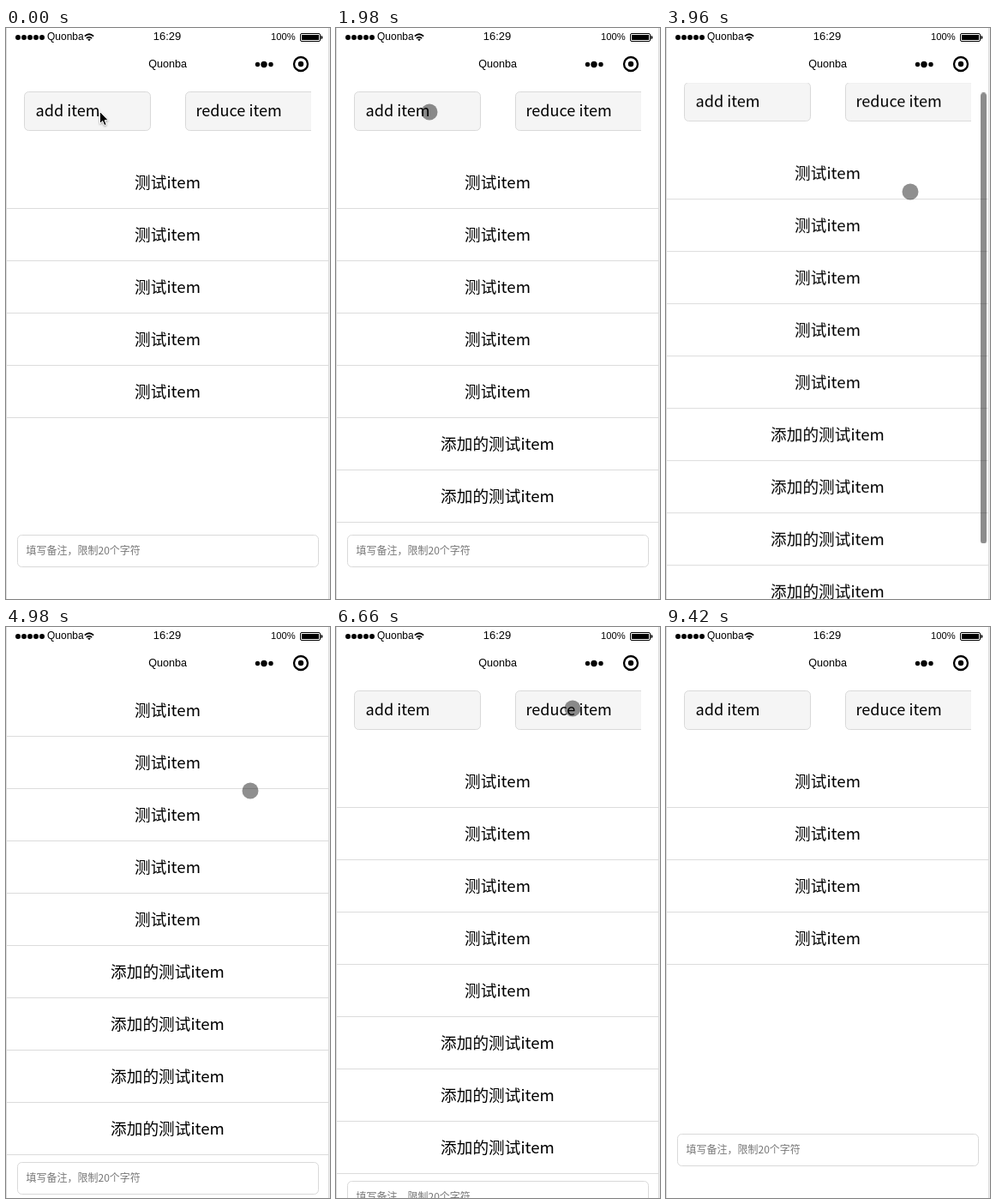
Recreate the animation shown at these times as an HTML page. Size 378 px wide and 666 px high, loop 9480 ms.

```html
<!DOCTYPE html>
<html lang="zh">
<head>
<meta charset="utf-8">
<title>List demo</title>
<style>
  html, body { margin: 0; width: 100%; height: 100%; overflow: hidden; background: #fff; }
  svg { display: block; }
  text { font-family: "Noto Sans CJK SC", "Noto Sans CJK", sans-serif; font-size: 18.67px; }
  .bar text { font-family: "Liberation Sans", Arial, sans-serif; }
  .mid { text-anchor: middle; }
  .btn rect { fill: #f5f5f5; stroke: #d9d9d9; }
  .btn text { font-size: 18.1px; }
  .rule { fill: #dcdcdc; }
</style>
</head>
<body>
<svg width="378" height="666" viewBox="0 0 378 666">
  <defs>
    <clipPath id="view"><rect y="64" width="378" height="602"/></clipPath>
    <clipPath id="toolbar"><rect x="20" y="70" width="336" height="60"/></clipPath>
  </defs>

  <g clip-path="url(#view)">
    <g id="page">
      <g clip-path="url(#toolbar)">
        <g class="btn" id="add">
          <rect x="21.5" y="74.5" width="147" height="45" rx="5"/>
          <text x="34.5" y="103">add item</text>
        </g>
        <g class="btn" id="reduce">
          <rect x="209.5" y="74.5" width="160" height="45" rx="5"/>
          <text x="221.5" y="103">reduce item</text>
        </g>
      </g>
      <g id="rows"></g>
      <g id="note">
        <rect x="13.5" y="591.5" width="351" height="37" rx="5" fill="#fff" stroke="#d9d9d9"/>
        <text x="23.5" y="614" style="font-size:12px" fill="#777">填写备注，限制20个字符</text>
      </g>
    </g>
    <rect id="thumb" x="367" y="66" width="7" height="526" rx="3.5" fill="#000" fill-opacity=".45"/>
  </g>

  <g class="bar">
    <g id="signal"></g>
    <text x="48" y="14.3" style="font-size:12px">Quonba</text>
    <g fill="none" stroke="#000" stroke-width="1.8">
      <path d="M91.8 9.6Q97 4.8 102.2 9.6M93.9 12Q97 9.2 100.1 12"/>
      <path d="M97 15.2L95.2 13.2Q97 11.8 98.8 13.2Z" fill="#000" stroke="none"/>
    </g>
    <text class="mid" x="188" y="14.3" style="font-size:13px">16:29</text>
    <text x="309" y="14.3" style="font-size:11.2px">100%</text>
    <rect x="343.5" y="6.5" width="23" height="9" rx="1.5" fill="none" stroke="#000"/>
    <rect x="345" y="8" width="20" height="6"/>
    <path d="M367.5 9Q369.5 9.2 369.5 11T367.5 13Z"/>
    <text class="mid" x="188.7" y="46.3" style="font-size:12.6px">Quonba</text>
    <circle cx="293.5" cy="42.5" r="2.7"/>
    <circle cx="301" cy="42.5" r="3.7"/>
    <circle cx="309" cy="42.5" r="2.7"/>
    <circle cx="344" cy="42" r="8" fill="none" stroke="#000" stroke-width="2.3"/>
    <circle cx="344" cy="42" r="3.2"/>
  </g>

  <rect class="rule" width="1" height="666"/>
  <rect class="rule" x="376" width="1.5" height="666"/>

  <path id="arrow" d="M109.5 97.5V111.5L112.7 108.6L114.8 113.6L117.2 112.6L115.1 107.7H119.4Z" stroke="#fff" stroke-width="1"
        style="filter:drop-shadow(0 1px 1px rgba(0,0,0,.35))"/>
  <circle id="touch" r="9.5" fill="#000" fill-opacity=".44"/>
</svg>

<script>
  const LOOP = 9480, ROW = 61, MAX_SCROLL = 83;
  const HOLD = 'steps(1, end)', EASE = 'ease-in-out';
  const adds = [720, 1440, 2100, 2820];
  const cuts = [6500, 6920, 7300, 7660, 8060];
  const $ = id => document.getElementById(id);

  // steps: [time, value, easing towards the next step]
  function play(el, prop, steps) {
    const full = [...steps];
    if (full[0][0] > 0) full.unshift([0, full[0][1], HOLD]);
    full.push([LOOP, full[full.length - 1][1]]);
    el.animate(
      full.map(([t, v, easing = HOLD]) => ({ offset: t / LOOP, [prop]: v, easing })),
      { duration: LOOP, iterations: Infinity });
  }
  const move = (x, y) => `translate(${x}px, ${y}px)`;

  function make(tag, attrs, parent, label = '') {
    const el = document.createElementNS('http://www.w3.org/2000/svg', tag);
    for (const k in attrs) el.setAttribute(k, attrs[k]);
    el.textContent = label;
    return parent.appendChild(el);
  }

  for (let i = 0; i < 5; i++) make('circle', { cx: 14 + i * 7, cy: 11, r: 3 }, $('signal'));

  // List rows: the first five are there at the start, the others get added
  for (let i = 0; i < 9; i++) {
    const g = make('g', {}, $('rows')), y = 150 + i * ROW;
    make('text', { x: 188.5, y: y + 37, class: 'mid' }, g, i < 5 ? '测试item' : '添加的测试item');
    make('rect', { x: 1, y: y + 60, width: 375, height: 1, class: 'rule' }, g);
    if (i > 3) {
      const shown = i > 4 ? [[0, 0], [adds[i - 5], 1]] : [[0, 1]];
      play(g, 'opacity', [...shown, [cuts[8 - i], 0]]);
    }
  }

  // The note field sits at the bottom, or below a longer list
  play($('note'), 'transform', [
    [0, move(0, 0)], [adds[2], move(0, 55)], [adds[3], move(0, 116)],
    [cuts[0], move(0, 55)], [cuts[1], move(0, 0)]
  ]);

  function press(id, taps) {
    const states = (up, down) => [[0, up], ...taps.flatMap(t => [[t - 60, down], [t + 120, up]])];
    play($(id).querySelector('rect'), 'fill', states('#f5f5f5', '#dedede'));
    play($(id).querySelector('text'), 'opacity', states(1, 0.6));
  }
  press('add', adds);
  press('reduce', cuts);

  const scroll = dist => [
    [0, move(0, 0)], [3840, move(0, 0), EASE], [4320, move(0, dist)],
    [4980, move(0, dist), EASE], [5220, move(0, 0)]
  ];
  play($('page'), 'transform', scroll(-MAX_SCROLL));
  play($('thumb'), 'transform', scroll(72));
  play($('thumb'), 'opacity', [
    [0, 0], [3840, 1], [4620, 1, 'linear'], [4920, 0],
    [5010, 1], [5760, 1, 'linear'], [6000, 0]
  ]);

  play($('arrow'), 'opacity', [[0, 1], [60, 0]]);
  play($('touch'), 'opacity', [[0, 0], [60, 1], [8640, 0]]);
  play($('touch'), 'transform', [
    [0, move(109, 98)], [3300, move(109, 98), 'linear'], [3360, move(112, 104), EASE],
    [3780, move(285, 191)], [5280, move(285, 191), EASE], [5640, move(275, 93)],
    [6420, move(276, 95)], [8340, move(276, 95), EASE], [8640, move(302, 54)]
  ]);
</script>
</body>
</html>
```
